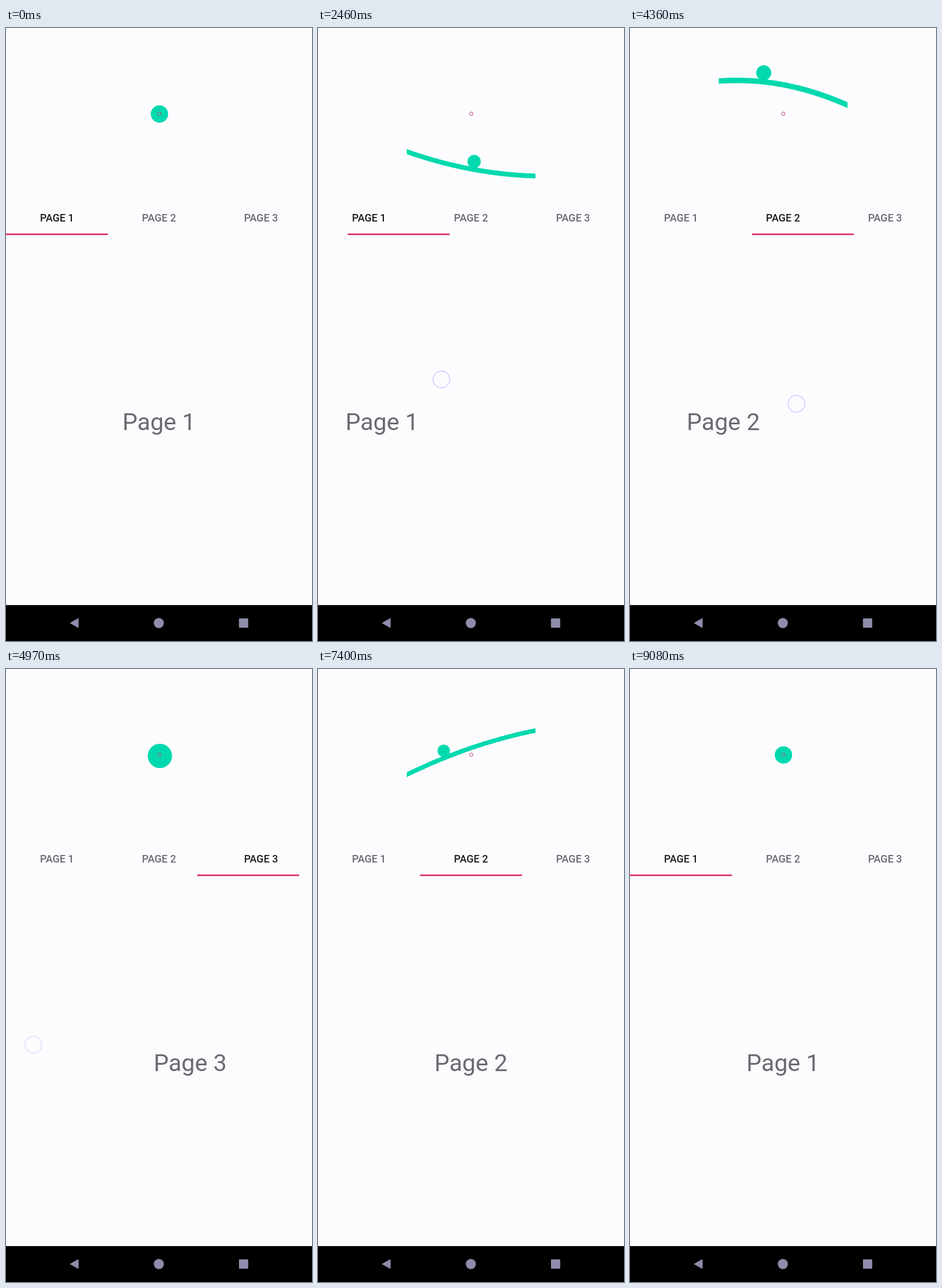
An HTML page that plays this animation: 529 by 1058 pixels, repeating every 9610 ms.

```html
<!DOCTYPE html>
<html lang="en">
<head>
<meta charset="utf-8">
<title>Swipe pages</title>
<style>
  html, body { margin: 0; width: 100%; height: 100%; overflow: hidden; background: #fcfcff; }
  svg { display: block; width: 100vw; height: 100vh; font-family: Roboto, sans-serif; }
  text { text-anchor: middle; }
  .tab { font-size: 18px; font-weight: 500; }
  .page { font-size: 41.2px; fill: #6c6a70; }
</style>
</head>
<body>
<svg viewBox="0 0 529 1058">
  <defs><clipPath id="stage"><rect x="153.5" y="37" width="222.5" height="226"/></clipPath></defs>
  <rect width="529" height="1058" fill="#fcfcff"/>

  <g clip-path="url(#stage)">
    <path id="hill" fill="none" stroke="#00d9ae"/>
    <circle id="ball" fill="#00d9ae"/>
    <g id="splash" fill="none" stroke-width="3" stroke-linecap="round">
      <path d="M317 158.5Q326 167 335 169.5" stroke="#00d9ae"/>
      <path d="M335 169.5Q341 170 349 168.5" stroke="#0079a6"/>
      <circle cx="335" cy="161" r="4" fill="#0079a6"/>
    </g>
    <circle id="mark" cx="266" cy="150" fill="#00d9ae"/>
  </g>
  <circle cx="265" cy="148" r="3" fill="none" stroke="#b8487c"/>

  <g id="tabs"></g>
  <rect id="bar" y="354.7" width="176.33" height="2.6" fill="#d8275c"/>
  <g id="pages"></g>
  <circle id="touch" r="14.5" fill="none" stroke="#c8cefc" stroke-width="1.5"/>

  <rect y="996" width="529" height="62"/>
  <g fill="#8f8dac">
    <path d="M111 1027L125 1019.2V1034.8Z" stroke="#8f8dac" stroke-linejoin="round"/>
    <circle cx="264.2" cy="1027" r="8.7"/>
    <rect x="402.7" y="1019" width="16" height="16" rx="1"/>
  </g>
</svg>
<script>
const LOOP = 9610, WIDTH = 529, CENTER = 264.5, TAB = WIDTH / 3;
const SETTLE = 540, FADE = 200, LAG = 18;
const LAND = 0.29, FALL = 1.3866;

// Each swipe drags a share (pull) of the way, then settles on its page.
const swipes = [
  { start: 1770, stop: 3163, from: 0, to: 1, pull: 0.62, pow: 1.08, x: 367, y: 606.5 },
  { start: 4150, stop: 4853, from: 1, to: 2, pull: 0.65, pow: 1, x: 391, y: 648.5 },
  { start: 5840, stop: 6620, hold: 370, from: 2, to: 1, pull: 0.825, pow: 0.766, x: 119.5, y: 637.5 },
  { start: 7850, stop: 8380, hold: 250, from: 1, to: 0, pull: 0.6, pow: 1, x: 150, y: 640 }
];

// Valley, climb, ridge and slope seen by the camera as the page moves.
const poses = [
  { p: LAND, mid: 243.5, slope: 21, bend: -9, x: 270, r: 11.5 },
  { p: 0.9585, mid: 193.5, slope: -45.5, bend: 1.3, x: 196, r: 10 },
  { p: 1, mid: 141.5, slope: -38, bend: 8, x: 217.3, r: 10.7 },
  { p: FALL, mid: 157, slope: 78.5, bend: 20.5, x: 244.8, r: 15.3 }
];

const $ = id => document.getElementById(id);
const clamp = x => Math.max(0, Math.min(1, x));
const ramp = (x, a, b) => clamp((x - a) / (b - a));
const easeOut = u => 1 - (1 - u) ** 5;

function set(el, attrs) {
  for (const k in attrs) el.setAttribute(k, attrs[k]);
}

function addText(parent, label, x, y, cls) {
  const el = document.createElementNS("http://www.w3.org/2000/svg", "text");
  el.textContent = label;
  set(el, { x, y, class: cls });
  return $(parent).appendChild(el);
}

const tabs = [], pages = [];
for (let i = 0; i < 3; i++) {
  tabs.push(addText("tabs", `PAGE ${i + 1}`, TAB * (i + 0.5), 334, "tab"));
  pages.push(addText("pages", `Page ${i + 1}`, CENTER, 693.5, "page"));
}

const swipeAt = t => swipes.filter(s => t >= s.start).pop();
const releaseOf = s => s.stop + (s.hold || 0);
const dragged = (s, t) => s.pull * ramp(t, s.start, s.stop) ** s.pow;

function position(t) {
  const s = swipeAt(t);
  if (!s) return 0;
  const pull = dragged(s, t), free = releaseOf(s);
  const share = pull + (1 - pull) * easeOut(ramp(t, free, free + SETTLE));
  return s.from + (s.to - s.from) * share;
}

function poseAt(p) {
  const i = Math.max(1, poses.findIndex(k => k.p >= p));
  const last = p > FALL ? poses.length - 1 : i;
  const a = poses[last - 1], b = poses[last], u = ramp(p, a.p, b.p);
  const pose = {};
  for (const k in a) pose[k] = a[k] + (b[k] - a[k]) * u;
  // lift over the crest, then drop out of view
  pose.mid -= 65 * Math.sin(Math.PI * Math.sqrt(ramp(p, 1, FALL)));
  pose.mid += 900 * Math.max(0, p - FALL);
  return pose;
}

function drawRide(p) {
  const { mid, slope, bend, x, r } = poseAt(p);
  const height = at => {
    const k = (at - 265) / 111;
    return mid + slope * k + bend * k * k;
  };
  const end = 140 + 250 * ramp(p, 0.18, 0.26);
  let d = `M140 ${height(140)}`;
  for (let at = 145; at <= end; at += 5) d += `L${at} ${height(at).toFixed(2)}`;
  set($("hill"), { d, "stroke-width": r * 0.72 });

  // a ballistic hop brings the ball onto the line
  const h = p / LAND;
  const ball = h < 1
    ? { cx: 265.3 + 4.7 * h, cy: 148.5 - 251.6 * h + 333 * h * h, r: 15 - 3.5 * h }
    : { cx: x, cy: height(x) - 1.2 * r, r };
  set($("ball"), ball);
  set($("splash"), { opacity: ramp(p, 1.33, 1.35) * ramp(p, 1.47, 1.43) });
  set($("mark"), { r: 21 * easeOut(ramp(p, 1.5, 1.8)) });
}

function drawTouch(s, t) {
  if (!s) return set($("touch"), { opacity: 0 });
  const cx = s.x - (s.to - s.from) * dragged(s, t) * WIDTH;
  const free = releaseOf(s);
  set($("touch"), { cx, cy: s.y, opacity: 1 - ramp(t, free, free + FADE) ** 2 });
}

function draw(t) {
  const s = swipeAt(t), p = position(t);
  const settling = s && t > releaseOf(s);
  const shown = settling ? position(t - LAG) : p;
  drawRide(shown);
  drawTouch(s, t);
  set($("bar"), { x: shown * TAB });
  tabs.forEach((el, i) => set(el, { fill: Math.round(p) === i ? "#1d1c20" : "#6b6975" }));
  pages.forEach((el, i) => set(el, { x: CENTER + (i - p) * WIDTH }));
}

const start = performance.now();
function tick() {
  draw((performance.now() - start) % LOOP);
  requestAnimationFrame(tick);
}
tick();
</script>
</body>
</html>
```
